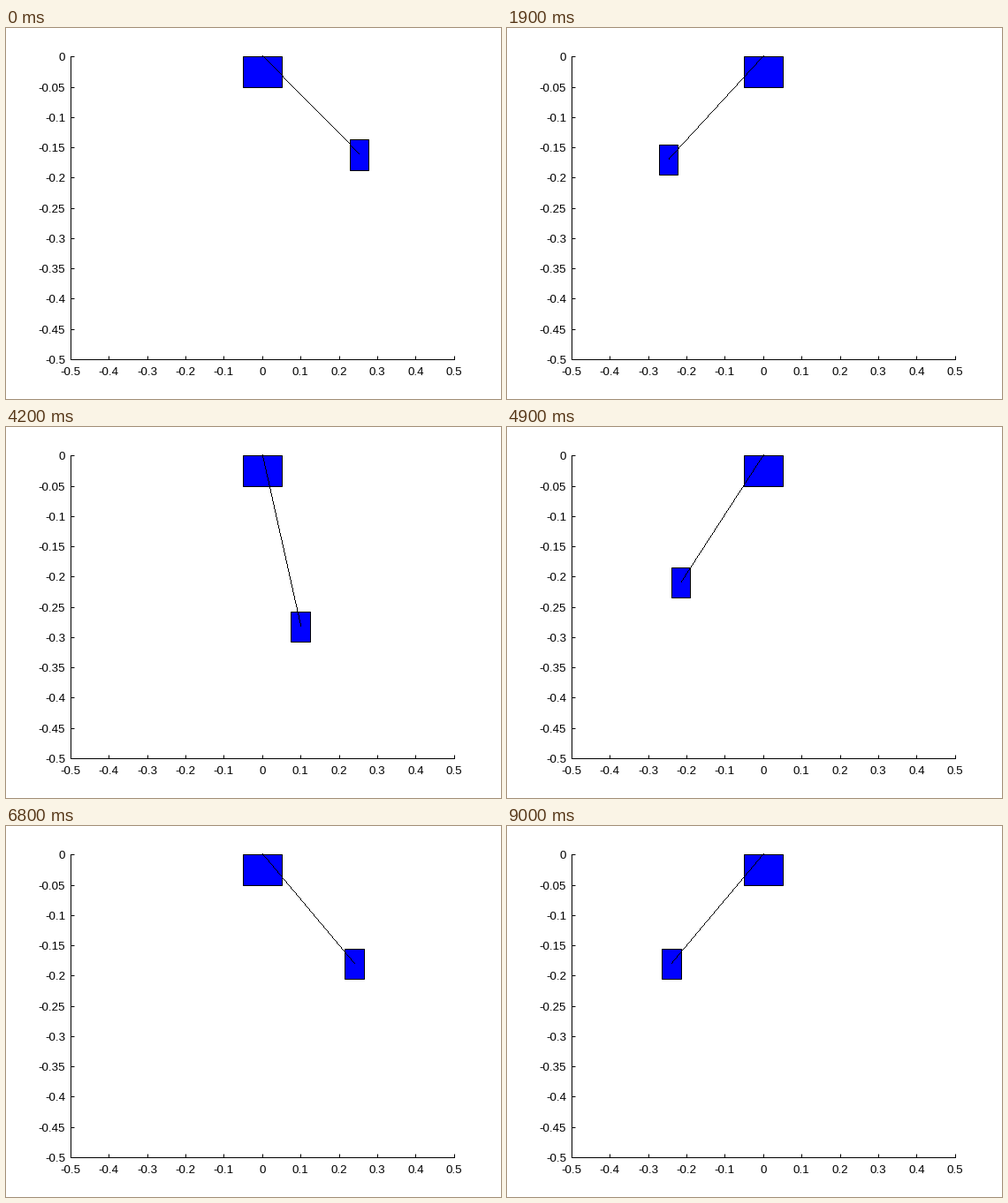
Write a matplotlib script that moves like this. It is 560 px wide and 420 px high and loops after 9.1 s.

```python
import numpy as np
import matplotlib.pyplot as plt
from matplotlib.animation import FuncAnimation
from matplotlib.patches import Rectangle

W, H, DPI = 560, 420, 100
PX = 72 / DPI                      # one pixel in points
LEFT, RIGHT, TOP, BOTTOM = 72.8, 506.8, 32.4, 374.8
G, LENGTH, START = 9.827, 0.3, 1.0
FRAMES, FPS, SUBSTEPS = 91, 30, 20
BOB = 0.05


def slope(s):
    return np.array([s[1], -G / LENGTH * np.sin(s[0])])


def swing():
    """Pendulum angle at each frame, integrated with RK4."""
    h = 1 / FPS / SUBSTEPS
    s = np.array([START, 0.0])
    angles = []
    for _ in range(FRAMES):
        angles.append(s[0])
        for _ in range(SUBSTEPS):
            a = slope(s)
            b = slope(s + h / 2 * a)
            c = slope(s + h / 2 * b)
            d = slope(s + h * c)
            s = s + h / 6 * (a + 2 * b + 2 * c + d)
    return np.array(angles)


def block(x, y, w, h):
    return ax.add_patch(Rectangle((x, y), w, h, fc="#0000ff", ec="black",
                                  lw=PX, clip_on=False, zorder=3))


def label(value, xy, dx, dy, ha):
    ax.annotate(f"{value:g}", xy, (dx * PX, dy * PX), textcoords="offset points",
                ha=ha, va="baseline", annotation_clip=False,
                family="Liberation Sans", size=13.33 * PX)


fig = plt.figure(figsize=(W / DPI, H / DPI), dpi=DPI, facecolor="white")
ax = fig.add_axes([LEFT / W, 1 - BOTTOM / H, (RIGHT - LEFT) / W, (BOTTOM - TOP) / H])
ax.set(xlim=(-0.5, 0.5), ylim=(-0.5, 0))
ax.spines[["top", "right"]].set_visible(False)
ax.spines[["left", "bottom"]].set_linewidth(PX)

xticks = np.arange(-5, 6) / 10
yticks = np.arange(-10, 1) / 20
ax.set_xticks(xticks, [])
ax.set_yticks(yticks, [])
ax.tick_params(direction="in", length=4 * PX, width=PX)
for t in xticks:
    label(t, (t, -0.5), 0, -18.4, "center")
for t in yticks:
    label(t, (-0.5, t), -5.5, -5, "right")

block(-0.05, -0.05, 0.1, 0.05)
bob = block(0, 0, BOB, BOB)
# The rod is a crisp, unsmoothed line: one pixel marker per step
rod, = ax.plot([], [], ",", color="black", clip_on=False, zorder=4)

theta = swing()


def draw(i):
    x, y = LENGTH * np.sin(theta[i]), -LENGTH * np.cos(theta[i])
    bob.set_xy((x - BOB / 2, y - BOB / 2))
    steps = max(abs(x) * (RIGHT - LEFT), abs(y) * 2 * (BOTTOM - TOP))
    u = np.linspace(0, 1, int(np.ceil(steps)) + 1)
    rod.set_data(x * u, y * u)
    return bob, rod


anim = FuncAnimation(fig, draw, frames=FRAMES, interval=100, repeat=True,
                     repeat_delay=0, blit=False)
plt.show()
```
